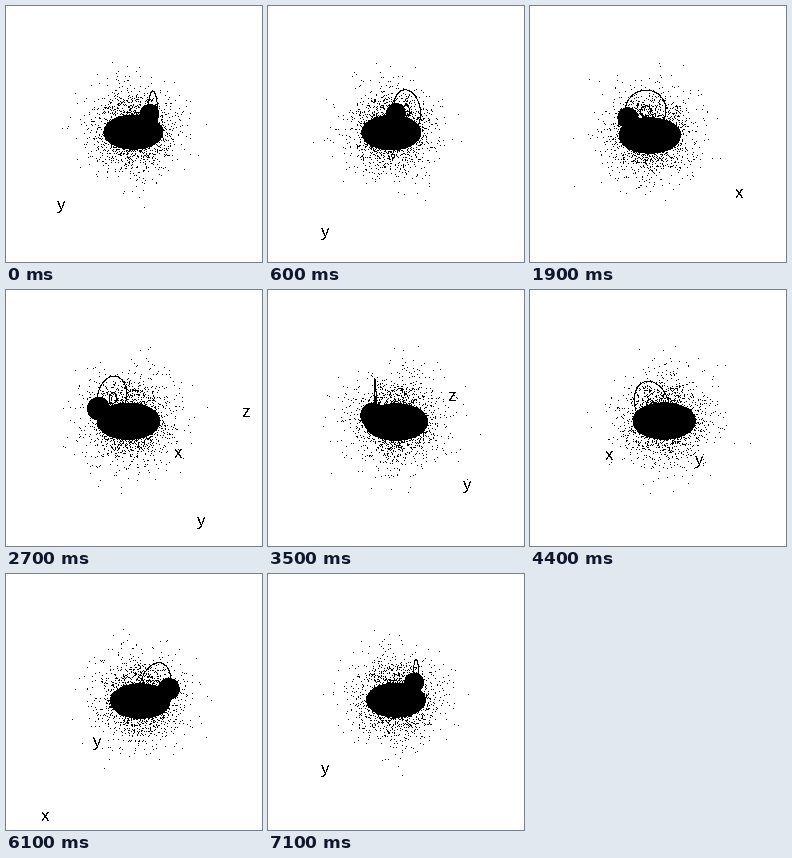
These frames come from a looping animation (256x256 px, 7200 ms). A matplotlib script:

```python
import numpy as np
import matplotlib.pyplot as plt
from matplotlib.animation import FuncAnimation
from matplotlib.patches import Ellipse

SIZE, DPI = 256, 100
FRAMES, INTERVAL = 72, 100
FOCAL = (SIZE / 2) / np.tan(np.radians(30))
TILT = np.radians(20)
CLIP = 112  # near and far planes, measured from the scene centre
EDGE = 1.5
PX = 72 / DPI

plt.rcParams["text.antialiased"] = False
plt.rcParams["font.family"] = "Liberation Sans"


def polar(radius, back):
    """Ground position that lies straight behind the centre at turn `back`."""
    return radius * np.exp(-1j * np.radians(back))


def project(ground, height, turn):
    """Turn the scene about its vertical axis; return screen x, y and depth."""
    g = ground * np.exp(1j * np.radians(turn))
    side, far = -g.imag, g.real
    up = height * np.cos(TILT) + far * np.sin(TILT)
    depth = far * np.cos(TILT) - height * np.sin(TILT)
    scale = FOCAL / (FOCAL + depth)
    return SIZE / 2 + side * scale, SIZE / 2 - up * scale, depth


# Point cloud around the body
rng = np.random.default_rng(11)
BODY = polar(8.5, 355)
COUNT = 1850
px, py, pz = rng.normal(0, 20, (3, COUNT))
cloud = (BODY + px + 1j * py, pz - 1)

# Upright rings sharing one centre
HUB, HUB_HEIGHT = polar(22, 58), 18.5


def ring(radius):
    phi = np.linspace(0, 2 * np.pi, int(14 * radius))
    return (HUB + polar(radius, 352) * np.cos(phi),
            HUB_HEIGHT + radius * np.sin(phi))


dot_sets = [cloud, ring(21.7), ring(5.5)]

HEAD, HEAD_HEIGHT, HEAD_RADIUS = polar(34.7, 30), 12.7, 10.3
BODY_HEIGHT, BODY_WIDE, BODY_TALL = -1, 30.4, 17.7

x_end, y_end = polar(98.8, 175), polar(79.7, 265)
labels = {"x": (x_end, -79.4), "y": (y_end, -79.4), "z": (x_end + y_end, -1)}

fig = plt.figure(figsize=(SIZE / DPI, SIZE / DPI), dpi=DPI, facecolor="white")
ax = fig.add_axes([0, 0, 1, 1])
ax.set_xlim(0, SIZE)
ax.set_ylim(SIZE, 0)
ax.axis("off")

dots = [ax.plot([], [], ",", color="black", antialiased=False)[0]
        for _ in dot_sets]
body, head = [ax.add_patch(Ellipse((0, 0), 1, 1, color="black", lw=0,
                                   antialiased=False)) for _ in range(2)]
texts = {name: ax.text(0, 0, name, fontsize=17 * PX, color="black",
                       ha="center", va="baseline") for name in labels}


def place(blob, ground, height, wide, tall, turn):
    x, y, depth = project(ground, height, turn)
    scale = FOCAL / (FOCAL + depth)
    blob.set_center((x, y))
    blob.set_width(2 * wide * scale)
    blob.set_height(2 * tall * scale)


def draw(i):
    turn = 360 * i / FRAMES
    for line, (ground, height) in zip(dots, dot_sets):
        x, y, _ = project(ground, height, turn)
        line.set_data(x, y)
    place(body, BODY, BODY_HEIGHT, BODY_WIDE, BODY_TALL, turn)
    place(head, HEAD, HEAD_HEIGHT, HEAD_RADIUS, HEAD_RADIUS, turn)
    for name, (ground, height) in labels.items():
        x, y, depth = project(ground, height, turn)
        texts[name].set_position((x, y + 6))
        # A label vanishes as soon as its anchor leaves the view volume
        inside = EDGE < x < SIZE - EDGE and y + 4 < SIZE
        texts[name].set_visible(bool(inside and abs(depth) < CLIP))
    return [*dots, body, head, *texts.values()]


anim = FuncAnimation(fig, draw, frames=FRAMES, interval=INTERVAL,
                     repeat=True, repeat_delay=0, blit=False)
plt.show()
```
